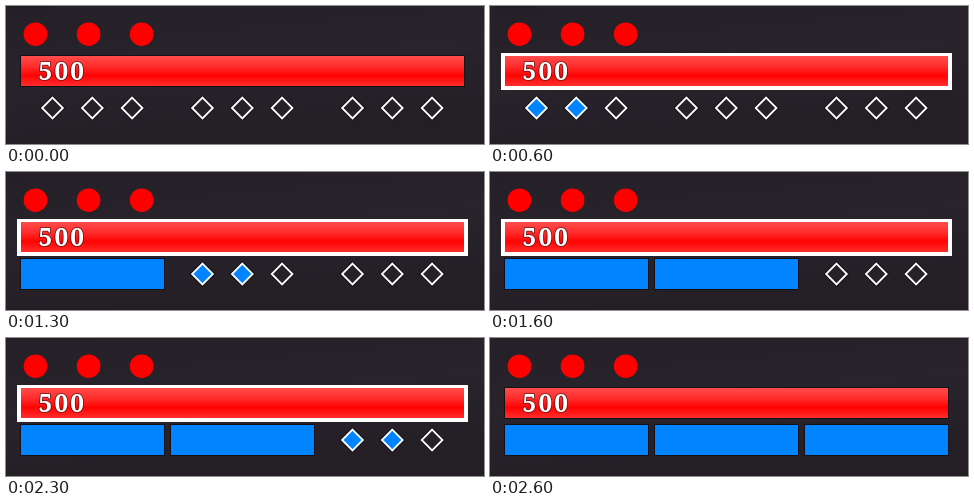
An HTML page that plays this animation: 478x138 px, repeating every 2700 ms.

```html
<!DOCTYPE html>
<html lang="en">
<head>
<meta charset="utf-8">
<title>Charge gauge</title>
<style>
html, body { margin: 0; width: 100%; height: 100%; overflow: hidden; background: #28232b; }
svg { display: block; width: 100%; height: 100%; }
.value {
  font: 600 24.5px "Noto Serif", serif;
  letter-spacing: 2.1px;
  fill: #fff;
  stroke: #3a1010;
  stroke-opacity: 0.75;
  stroke-width: 1.6px;
  stroke-linejoin: round;
  paint-order: stroke;
}
</style>
</head>
<body>
<svg id="stage" viewBox="0 0 478 138">
  <defs>
    <linearGradient id="back" x2="0.3" y2="1">
      <stop offset="0" stop-color="#252027"/>
      <stop offset="0.5" stop-color="#29242c"/>
      <stop offset="1" stop-color="#241f25"/>
    </linearGradient>
    <linearGradient id="health" x2="0" y2="1">
      <stop offset="0" stop-color="#ff4c4c"/>
      <stop offset="0.35" stop-color="#ff2c2c"/>
      <stop offset="0.65" stop-color="#ff0303"/>
      <stop offset="1" stop-color="#ff2e2e"/>
    </linearGradient>
  </defs>
  <rect width="478" height="138" fill="url(#back)"/>
</svg>
<script>
const LOOP = 2700;
const FRAME = 100;
const FIRST_HIT = 200;
const HIT_GAP = 275;
const OUTLINE = [100, 2500];
const BLUE = "#0084ff";
const EDGE = "#141015";
const stage = document.getElementById("stage");

function add(tag, attrs) {
  const node = document.createElementNS("http://www.w3.org/2000/svg", tag);
  for (const key in attrs) node.setAttribute(key, attrs[key]);
  return stage.appendChild(node);
}

function show(node, on) {
  node.style.display = on ? "" : "none";
}

for (let i = 0; i < 3; i++) {
  add("circle", { cx: 29.5 + i * 53.1, cy: 28.2, r: 11.8, fill: "#f00" });
}

add("rect", { x: 14, y: 49, width: 445, height: 32, fill: EDGE });
const outline = add("rect", { x: 11, y: 47, width: 451, height: 37, fill: "#fff" });
add("rect", { x: 15, y: 50, width: 443, height: 30, fill: "url(#health)" });
add("text", { x: 32.6, y: 74.3, class: "value" }).textContent = "500";

// Three groups of three charges; a full group turns into a solid block.
const groups = [0, 1, 2].map(g => {
  const left = 15 + g * 150;
  const diamonds = [0, 1, 2].map(i => {
    const path = `M${left + 31.5 + i * 39.8} 91.6l10.4 10.4l-10.4 10.4l-10.4 -10.4z`;
    add("path", { d: path, fill: "none", stroke: EDGE, "stroke-width": 3.6 });
    return add("path", { d: path, stroke: "#fff", "stroke-width": 1.8 });
  });
  // The plate hides the diamonds and leaves a dark edge around the block.
  const plate = add("rect", { x: left - 1, y: 86, width: 145, height: 32, fill: EDGE });
  const block = add("rect", { x: left, y: 87, width: 143, height: 30, fill: BLUE });
  return { diamonds, cover: [plate, block] };
});

function draw(time) {
  const t = Math.floor((time % LOOP) / FRAME) * FRAME;
  const hits = Math.floor((t - FIRST_HIT) / HIT_GAP) + 1;

  show(outline, t >= OUTLINE[0] && t < OUTLINE[1]);
  groups.forEach(({ diamonds, cover }, g) => {
    const charge = hits - g * 3;
    diamonds.forEach((d, i) => d.setAttribute("fill", i < charge ? BLUE : "#252128"));
    cover.forEach(node => show(node, charge >= 3));
  });
}

const start = performance.now();
function tick() {
  draw(performance.now() - start);
  requestAnimationFrame(tick);
}
tick();
</script>
</body>
</html>
```
